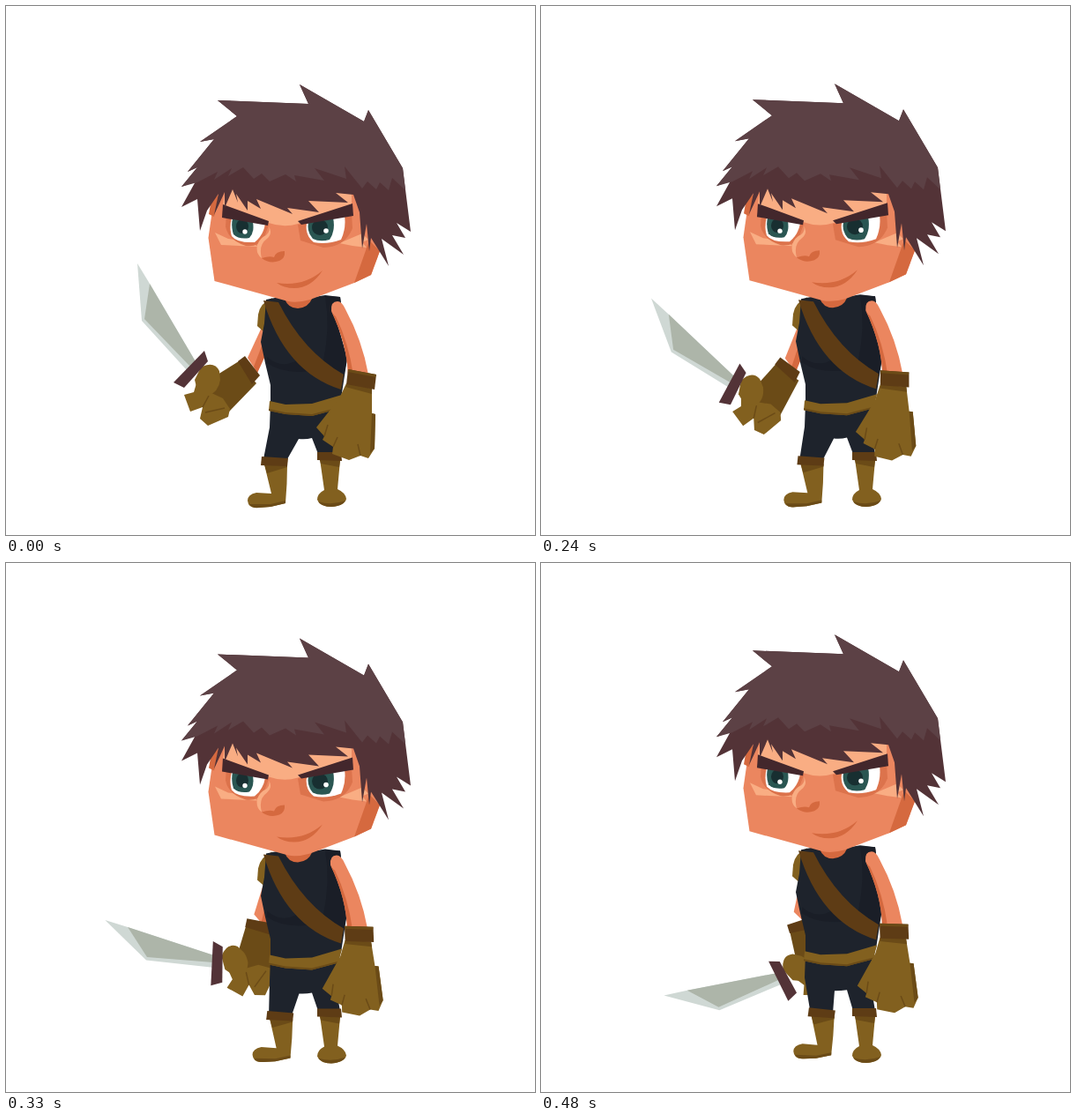
Recreate the animation shown at these times as an HTML page. Size 600 by 600 pixels, loop 510 ms.

```html
<!DOCTYPE html>
<html lang="en">
<head>
<meta charset="utf-8">
<title>Swordsman idle</title>
<style>
  html, body { margin: 0; width: 100%; height: 100%; overflow: hidden; background: #fff; }
  svg { display: block; width: 100vw; height: 100vh; }
  .skin { fill: #eb865f; }
  .shade { fill: #d5693f; }
  .blush { fill: #dc734c; }
  .glow { fill: #f9ad83; }
  .hair { fill: #5c4145; }
  .fringe { fill: #533337; }
  .brow { fill: #43272c; }
  .cloth { fill: #1e232c; }
  .fold { fill: #1a1e27; }
  .tan { fill: #82601f; }
  .umber { fill: #6b4b17; }
  .strap { fill: #5e3c15; }
  .white { fill: #fff; }
  .iris { fill: #2a5652; }
  .pupil { fill: #182f31; }
  .steel { fill: #adb5a9; }
  .edge { fill: #cfd8d4; }
  .crease { fill: none; stroke: #6b4b17; stroke-width: 1.5; }
</style>
</head>
<body>
<svg viewBox="0 0 600 600">
  <g id="upperArm">
    <path class="skin" d="M293 358L274 399L285 416L297 390Z"/>
    <path class="shade" d="M293 378L281 409L285 416L297 390Z"/>
  </g>

  <g id="swordHand">
    <path class="umber" d="M264 403L240 418L230 442L253 460L284 428Z"/>
    <path class="strap" d="M271 397L288 419L279 429L263 403Z"/>
    <path class="tan" d="M216 428L213 438L202 441L209 460L223 455L220 468L229 476L252 466L254 457L246 445L231 438Z"/>
    <path class="crease" d="M223 455L230 442M226 461L248 456"/>
    <path class="edge" d="M149 292L163 315L216 405L205 413L154 357Z"/>
    <path class="steel" d="M163 315L216 405L209 409L157 355Z"/>
    <path class="tan" d="M221 410Q236 402 242 414L243 424Q241 438 229 442L217 436L214 424Z"/>
    <path class="fringe" d="M225 391L229 403L202 433L190 427Z"/>
  </g>

  <path class="cloth" id="pants"/>
  <g id="leftBoot">
    <path class="tan" d="M293 520L301 553L284 552Q274 554 274 561Q275 570 285 569L300 568L317 564Q319 541 319 520Z"/>
    <path class="umber" d="M276 565Q279 570 287 569L300 568L317 564L317 561L300 565Z"/>
    <path class="umber" d="M293 520L296 530L319 523V520Z"/>
    <path class="strap" d="M290 511L320 513L319 522L289 521Z"/>
  </g>
  <g id="rightBoot">
    <path class="tan" d="M356 514L361 549Q353 553 353 560Q356 568 369 568Q384 567 386 559Q385 552 376 548L379 515Z"/>
    <path class="umber" d="M354 562Q359 568 369 568Q382 567 385 561Q369 567 354 562Z"/>
    <path class="umber" d="M356 515L357 519L378 523L379 515Z"/>
    <path class="strap" d="M353 506L380 506L381 516L353 515Z"/>
  </g>

  <g id="torso">
    <path class="tan" d="M302 331Q288 337 286 350L285 363L293 370Z"/>
    <path class="cloth" d="M295 333L310 330L350 330L362 328L379 330L380 338L371 344L380 375L387 400L380 445L377 450L300 455L300 430L294 405L289 381L293 360Z"/>
    <path class="fold" d="M362 329L379 330L380 338L371 344L387 400L383 420L360 402Q368 365 362 329Z"/>
    <path class="fold" d="M296 398Q312 412 330 402L345 414Q315 418 296 405Z"/>
    <path class="strap" d="M292 334L309 336Q337 392 383 418L380 435Q316 415 292 334Z"/>
    <path class="tan" d="M299 448L317 452L347 451L381 441L377 457L347 465L317 463L298 459Z"/>
    <path class="umber" d="M298 457L317 461L347 463L378 455L377 457L347 465L317 463L298 459Z"/>
    <path class="shade" d="M316 332Q320 343 331 343Q343 342 347 332Z"/>
  </g>

  <g id="rightArm">
    <path class="skin" d="M369 346Q368 335 376 335Q381 335 385 344Q404 379 411 418L388 419Q387 384 369 346Z"/>
    <path class="shade" d="M369 346Q372 351 374 352Q389 383 394 419H388Q387 384 369 346Z"/>
  </g>
  <g id="rightHand">
    <path class="tan" d="M386 428L378 445L352 478L361 488L359 492L371 500L370 508L389 515L402 510L411 513L418 502L419 463L415 462L415 434Z"/>
    <path class="umber" d="M387 428L385 432L415 440V434Z"/>
    <path class="umber" d="M415 462L419 463L418 502L413 507Z"/>
    <path class="crease" d="M361 488L365 475M371 500L376 489M402 510L399 497"/>
    <path class="strap" d="M388 412L420 418L418 435L386 429Z"/>
    <path class="umber" d="M388 412L420 418L419 421L388 415Z"/>
  </g>

  <g id="head">
    <path class="skin" d="M240 190L229.500 263L236.500 312L320 335Q331 337 345 333L395 314L414 305L424 278L408 190Z"/>
    <path class="shade" d="M412 266L395 314L414 305L424 278Z"/>
    <path class="glow" d="M250 200H392V226L331 247Q315 252 298 246L246 226Z"/>
    <path class="shade" d="M233 219L230 236L236 239L241 215Z"/>
    <path class="glow" d="M237 257L252 264L275 267L286 273L244 271Z"/>
    <path class="glow" d="M378 269L404 258L411 265L404 268L409 274L393 272Z"/>
    <path class="blush" d="M250 236L298 248L293 262Q286 274 272 272Q252 266 249 250Z"/>
    <path class="blush" d="M331 248L392 236L393 252Q385 273 360 274L334 266Z"/>
    <path class="white" d="M256 240L294 247Q292 260 282 268Q262 269 256 261Q253 252 256 240Z"/>
    <path class="white" d="M341 247L384 238Q386 252 380 265Q364 271 349 268Q339 260 341 247Z"/>
    <path class="iris" d="M257 241L280 245Q282 257 276 263Q264 265 258 259Q255 250 257 241Z"/>
    <path class="iris" d="M343 246L371 240Q374 255 367 265Q356 268 348 264Q341 256 343 246Z"/>
    <ellipse class="pupil" cx="268" cy="250" rx="7" ry="8"/>
    <ellipse class="pupil" cx="356" cy="251" rx="9" ry="9"/>
    <circle class="white" cx="271" cy="256" r="2.7"/>
    <circle class="white" cx="363" cy="255" r="2.8"/>
    <path class="brow" d="M246 225L298 244L297 249L245 240Z"/>
    <path class="brow" d="M331 244L393 224L394 238L335 248Z"/>
    <path class="glow" d="M298 250Q303 258 296 264Q286 271 290 286Q283 281 285 271Q288 263 295 260Q300 256 298 250Z"/>
    <path class="shade" d="M290 286Q299 283 304 285Q306 278 316 278Q317 286 310 289Q299 293 290 286Z"/>
    <path class="shade" d="M307 314Q337 319 359 300Q346 320 327 320Q315 320 307 314Z"/>
    <path class="fringe" d="M240 107L343 111L333 89L406 131L411 118L450 184L459 256L443 246L453 263L438 260L451 282L426 264L434 295L414 263L412 278L409 247L404 275L401 234L394 214L374 212L388 223L343 221L355 234L319 229L325 236L284 219L289 230L274 221L274 232L261 213L263 223L257 208L248 229L248 211L236 237L241 213L228 232L220 255L217 219L199 228L215 199L199 205L217 183L206 188L236 151L220 154L262 125Z"/>
    <path class="hair" d="M240 107L343 111L333 89L406 131L411 118L450 184L453 209L438 195L434 209L424 200L420 208L410 199L404 207L384 182L386 196L350 184L361 198L327 192L329 199L317 191L299 199L290 190L281 196L269 183L252 193L256 184L236 197L240 188L217 200L199 205L217 183L206 188L236 151L220 154L262 125Z"/>
  </g>
</svg>
<script>
  const LOOP = 510, STEP = 30;
  const part = id => document.getElementById(id);
  const ease = (t, from, to) => {
    const k = Math.min(1, Math.max(0, (t - from) / (to - from)));
    return (1 - Math.cos(Math.PI * k)) / 2;
  };
  const pose = (id, x, y, turn = 0, px = 0, py = 0) =>
    part(id).setAttribute('transform', `translate(${x} ${y}) rotate(${turn} ${px} ${py})`);

  function draw(now) {
    const t = Math.floor(now % LOOP / STEP) * STEP;
    const swing = ease(t, 120, 500);
    const rise = ease(t, 165, 525);
    const drift = ease(t, 50, 335);
    const up = -8 * rise, leg = 14 * rise;

    pose('head', 0, up);
    pose('torso', 0, up);
    pose('upperArm', 0, up, -13 * swing, 300, 345);
    pose('swordHand', 20 * swing, -2 * swing, -71 * swing, 276, 413);
    pose('rightArm', -drift, up);
    pose('rightHand', -2.5 * drift, -6 * rise, -9 * drift, 403, 423);
    pose('leftBoot', leg * .9, -6.5 * rise, 2 * rise, 302, 565);
    pose('rightBoot', 0, -rise);
    part('pants').setAttribute('d',
      `M300 ${450 + up}L299 ${478 + up}L${292 + leg} ${514 - 5 * rise}H${319 + leg * .9}` +
      `L${332 + rise} ${491 - 6 * rise}Q340 ${492 - 7 * rise} 347 ${490 - 6 * rise}L354 508H379` +
      `L373 ${480 + up}L379 ${446 + up}Z`);
    requestAnimationFrame(draw);
  }
  requestAnimationFrame(draw);
</script>
</body>
</html>
```
